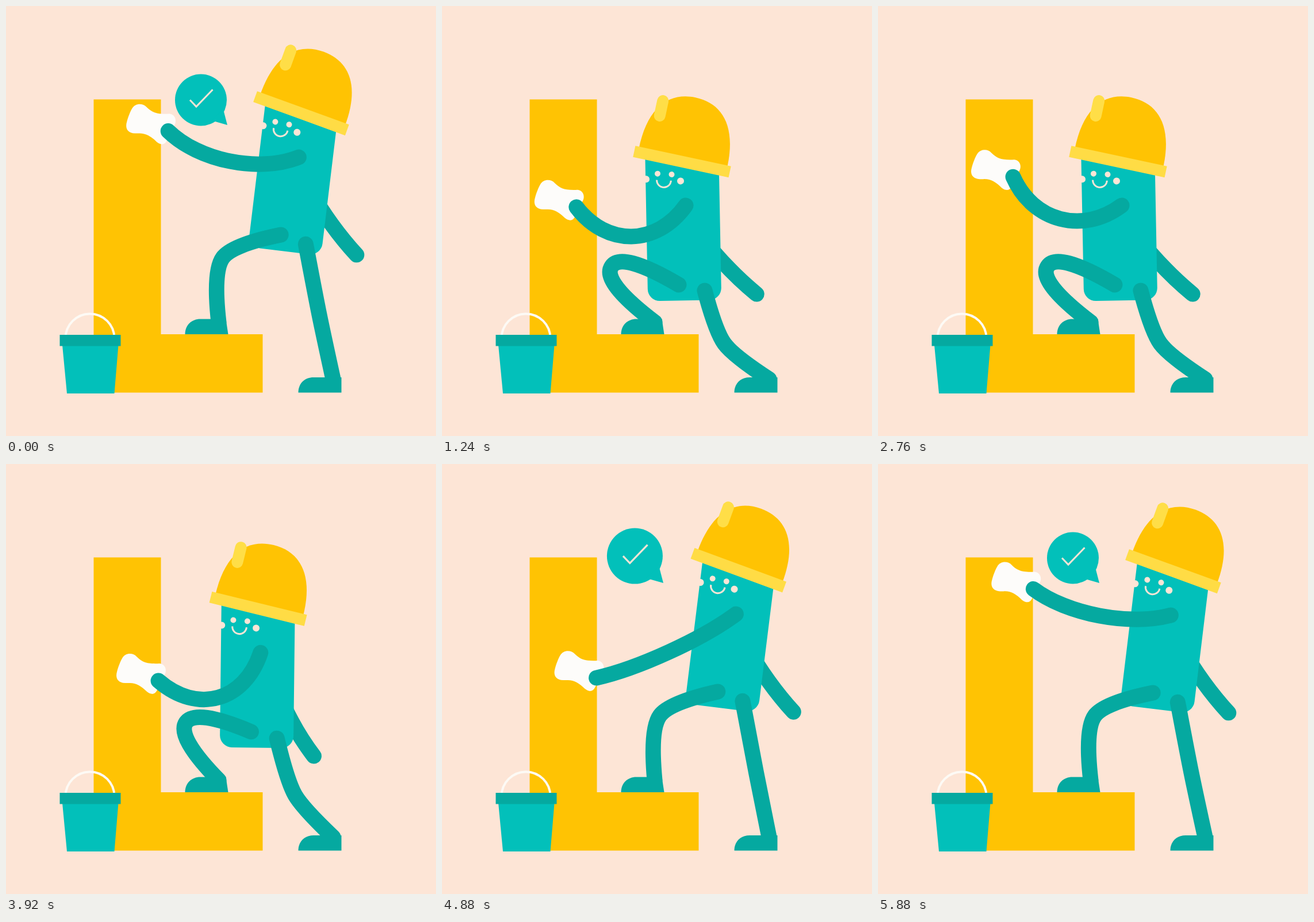
An HTML page that plays this animation: 748x748 px, repeating every 5920 ms.

```html
<!DOCTYPE html>
<html lang="en">
<head>
<meta charset="utf-8">
<title>Polishing the letter</title>
<style>
  html, body { margin: 0; width: 100%; height: 100%; overflow: hidden; background: #fde5d6; }
  svg { display: block; width: 100vw; height: 100vh; }
  .limb { fill: none; stroke: #05a9a0; stroke-width: 27; stroke-linecap: round; stroke-linejoin: round; }
  .dark { fill: #05a9a0; }
  .teal { fill: #02c0ba; }
  .sun { fill: #ffc303; }
  .skin { fill: #fde5d6; }
  .line { fill: none; stroke: #fde5d6; stroke-width: 3; }
</style>
</head>
<body>
<svg viewBox="0 0 748 748">
  <path class="sun" d="M152.5 162.5H269.5V571H446.5V672.5H152.5Z"/>

  <!-- bucket -->
  <path d="M103.5 578A42.5 42.5 0 0 1 188.5 578" fill="none" stroke="#fdfaf5" stroke-width="4"/>
  <path class="teal" d="M98 590H195.5L188.5 674H106Z"/>
  <path class="dark" d="M93.5 572H199.5V591.5H93.5Z"/>

  <g id="bubble">
    <circle class="teal" cx="-46" cy="-43.5" r="45"/>
    <path class="teal" d="M-28 -8L0 0L-7 -27Z"/>
    <path class="line" d="M-65 -43.5L-54 -32L-25.5 -61.5"/>
  </g>

  <g id="body">
    <path id="backArm" class="limb"/>
    <path class="teal" d="M-63.5 -254H64.5V-21A21 21 0 0 1 43.5 0H-42.5A21 21 0 0 1 -63.5 -21Z"/>
    <g class="skin">
      <circle cx="-42.5" cy="-221.5" r="5"/>
      <circle cx="-18" cy="-219.7" r="5"/>
      <circle cx="-62.6" cy="-212.3" r="6"/>
      <circle cx="-2.7" cy="-208" r="6"/>
    </g>
    <path class="line" d="M-44 -210.5A12.3 12.3 0 0 0 -19.4 -209"/>
    <g transform="translate(.4 -241.6) rotate(13.1)">
      <path class="sun" d="M-78 -5C-79 -82 -46 -114 0 -114S80 -82 79 -5Z"/>
      <path d="M-54.5 -96.5V-70" stroke="#ffde47" stroke-width="20" stroke-linecap="round"/>
      <path d="M-85 -10H85V10H-85Z" fill="#ffdc45"/>
    </g>
  </g>

  <path id="backLeg" class="limb"/>
  <path class="dark" d="M508.5 672.5C508.5 656 520 646 535 646H583.500V672.5Z"/>
  <path id="frontLeg" class="limb"/>
  <path class="dark" d="M311.5 571C311.5 555 323 544.5 338 544.5H382.5L386.5 571Z"/>

  <path id="sponge" fill="#fdfcfa" d="M-72 -16C-70 -24 -66 -34 -63 -39C-58 -49 -44 -49 -38 -42C-28 -32 -20 -29 2 -30C12 -29 16 -18 10 -9L-2 16C-6 24 -12 25 -20 19C-30 9 -40 3 -52 4H-58C-72 3 -75 -6 -72 -16Z"/>
  <path id="frontArm" class="limb"/>
</svg>
<script>
const LOOP = 5920, SCRUB = LOOP / 8, RADIUS = 35;
const $ = id => document.getElementById(id);
const set = (id, name, value) => $(id).setAttribute(name, value);
const mix = (a, b, k) => a.map((v, i) => v + (b[i] - v) * k);
const unit = ([x, y]) => [x / Math.hypot(x, y), y / Math.hypot(x, y)];

// Smooth 0 to 1, starting at `from` and lasting `span`
function ease(t, from, span) {
  const x = Math.min(1, Math.max(0, (t - from) / span));
  return x * x * (3 - 2 * x);
}

// 0 = standing, 1 = crouching, slightly negative = on tiptoe
const crouch = t => ease(t, 0, 1010) - ease(t, 3630, 960)
  - .12 * (ease(t, 4780, 350) - ease(t, 5130, 760));

const bubbleSize = t => 1 - ease(t, 80, 320) + 1.08 * ease(t, 4560, 300) - .08 * ease(t, 4860, 220);

// Spots being polished: time, x, y
const SPOTS = [[0, 276, 252], [720, 267, 320], [1960, 268, 372],
  [2760, 270, 299], [3920, 234, 361], [4880, 293, 347], [5880, 276, 252]];

// The hand circles clockwise while drifting from spot to spot
function handAt(t) {
  let centre = SPOTS[0].slice(1);
  SPOTS.slice(1).forEach((spot, i) => {
    const from = SPOTS[i][0];
    centre = mix(centre, spot.slice(1), ease(t, from, spot[0] - from));
  });
  const turn = 2 * Math.PI * (t + 20) / SCRUB;
  return [centre[0] + RADIUS * Math.sin(turn), centre[1] - RADIUS * Math.cos(turn)];
}

// Thigh and shin meet smoothly along the tangent halfway between them
function leg(id, hip, knee, ankle) {
  const thigh = [knee[0] - hip[0], knee[1] - hip[1]];
  const shin = [ankle[0] - knee[0], ankle[1] - knee[1]];
  const a = unit(thigh), b = unit(shin), way = unit([a[0] + b[0], a[1] + b[1]]);
  const along = k => [knee[0] + way[0] * k, knee[1] + way[1] * k];
  set(id, 'd', `M${hip}Q${along(-.26 * Math.hypot(...thigh))} ${knee}Q${along(.26 * Math.hypot(...shin))} ${ankle}`);
}

// The arm sags more as the hand nears the shoulder
function arm(id, hand, shoulder) {
  const dx = shoulder[0] - hand[0], dy = shoulder[1] - hand[1], d = Math.hypot(dx, dy);
  const sag = 4 / 3 * Math.max(0, 58 - (d - 180) * .535) / d;
  const at = k => [hand[0] + dx * k - dy * sag, hand[1] + dy * k + dx * sag];
  set(id, 'd', `M${hand}C${at(.27)} ${at(.73)} ${shoulder}`);
}

function draw(t) {
  const p = crouch(t);
  const [ox, oy, deg] = mix([484, 426.5, 6.9], [421.7, 512.3, -1.1], p);
  const c = Math.cos(deg * Math.PI / 180), s = Math.sin(deg * Math.PI / 180);
  const world = (x, y) => [ox + x * c - y * s, oy + x * s + y * c];
  set('body', 'transform', `translate(${ox} ${oy}) rotate(${deg})`);

  // The free arm swings in while the body is moving
  const swing = Math.sin(Math.PI * Math.max(0, p));
  set('backArm', 'd', `M30 -112Q${mix([75, -52], [51, -30], swing)} ${mix([125.7, -8.8], [85.7, 26], swing)}`);

  leg('frontLeg', world(-9.2, -27.5), mix([377, 438], [295, 453], p), [370, 550]);
  leg('backLeg', world(35.6, -16.6), mix([545, 537], [491, 587], p), [569, 649]);

  const hand = handAt(t);
  set('sponge', 'transform', `translate(${hand})`);
  arm('frontArm', hand, world(5.5, -165.3));

  set('bubble', 'transform', `translate(385 207) scale(${bubbleSize(t)})`);
}

const start = performance.now();
(function tick() {
  draw((performance.now() - start) % LOOP);
  requestAnimationFrame(tick);
})();
</script>
</body>
</html>
```
